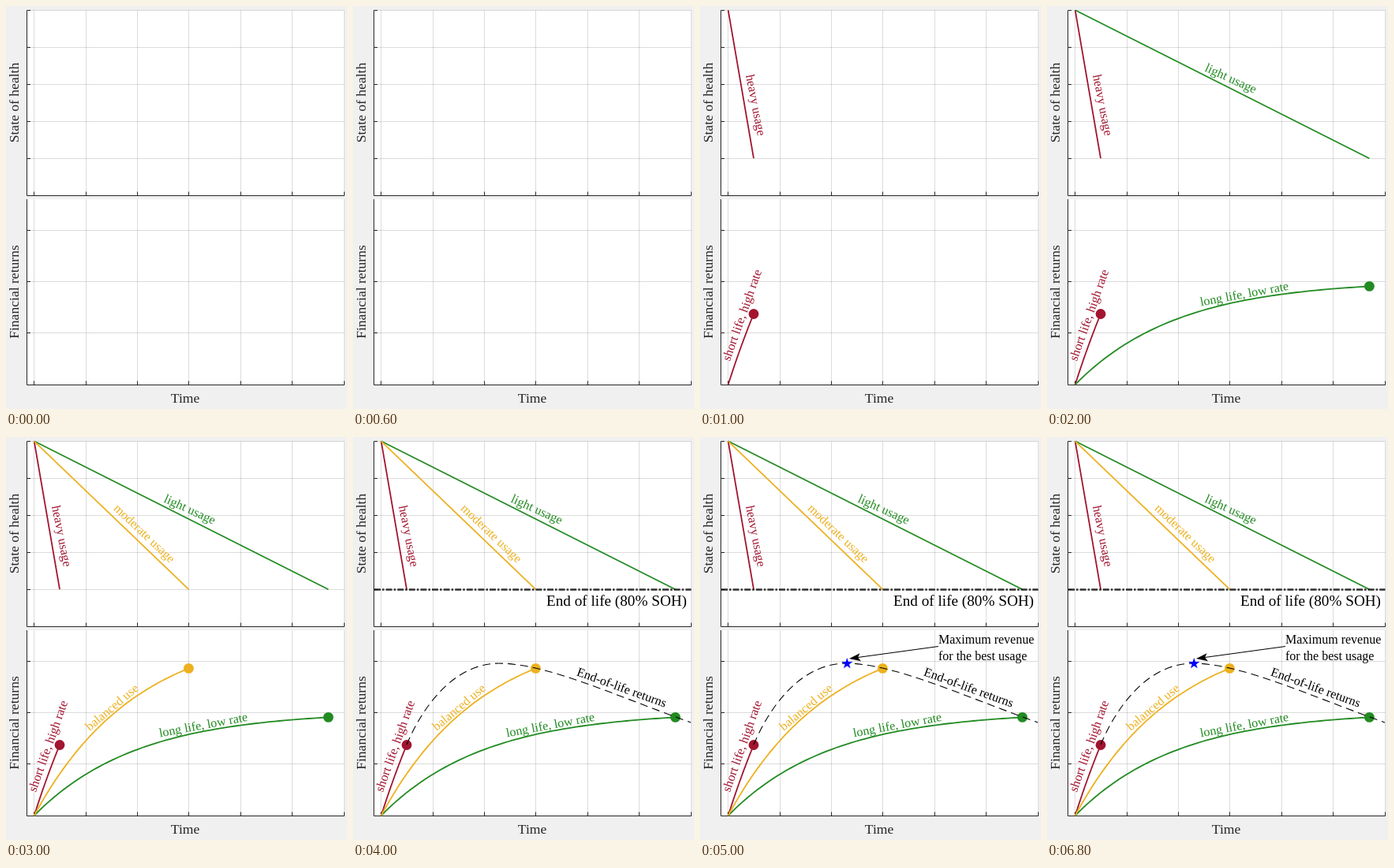
An HTML page that plays this animation: 432 by 511 pixels, repeating every 8 s.

```html
<!DOCTYPE html>
<html lang="en">
<head>
<meta charset="utf-8">
<title>Battery usage and returns</title>
<style>
  html, body { margin: 0; width: 100%; height: 100%; overflow: hidden; background: #f0f0f0; }
  svg { display: block; }
  text { font: 16px "Liberation Serif", "Times New Roman", serif; }
  .label { font-size: 17.6px; fill: #262626; text-anchor: middle; }
  .curve { fill: none; stroke-width: 1.8; }
</style>
</head>
<body>
<svg id="stage" width="432" height="511" viewBox="0 0 432 511"></svg>
<script>
const LEFT = 26.5, RIGHT = 428.5, ORIGIN = 35.7;
const TOP = 5.3, END_OF_LIFE = 193.2, BASE = 480;
const RED = "#a2142f", GREEN = "#228b22", YELLOW = "#edb120";
const DECAY = 0.0077;

const path = (d, attrs) => `<path d="${d}" ${attrs}/>`;
const label = (x, y, angle, text, attrs = "") =>
  `<text transform="translate(${x} ${y}) rotate(${angle})" ${attrs}>${text}</text>`;

function axes(top, bottom, yTicks) {
  const xTicks = [35.5, 101.5, 166.5, 231.5, 297.5, 362.5, 428.5];
  let grid = "", ticks = `M${LEFT} ${top}V${bottom}H${RIGHT}`;
  for (const x of xTicks) {
    grid += `M${x} ${top}V${bottom}`;
    ticks += `M${x} ${bottom}v-5`;
  }
  for (const y of yTicks) {
    grid += `M${LEFT} ${y}H${RIGHT}`;
    ticks += `M${LEFT} ${y}h4.5`;
  }
  return `<rect x="26" y="${top}" width="403" height="${bottom - top}" fill="#fff"/>` +
    path(grid, 'stroke="#262626" stroke-opacity=".16"') +
    path(ticks, 'fill="none" stroke="#262626"');
}

// A straight loss of health above, saturating returns below.
function usage(color, endX, endY, ...labels) {
  const span = endX - ORIGIN;
  const scale = (BASE - endY) / (1 - Math.exp(-DECAY * span));
  let returns = `M${ORIGIN} ${BASE}`;
  for (let i = 1; i <= 60; i++) {
    const t = span * i / 60;
    returns += `L${ORIGIN + t} ${BASE - scale * (1 - Math.exp(-DECAY * t))}`;
  }
  const line = `M${ORIGIN} ${TOP}L${endX} ${END_OF_LIFE}`;
  return path(line + returns, `class="curve" stroke="${color}"`) +
    `<circle cx="${endX}" cy="${endY}" r="6.4" fill="${color}"/>` +
    labels.map(args => label(...args, `fill="${color}"`)).join("");
}

function star(cx, cy, radius) {
  const points = Array.from({ length: 10 }, (_, i) => {
    const r = i % 2 ? radius * 0.382 : radius, a = i * Math.PI / 5;
    return `${cx + r * Math.sin(a)},${cy - r * Math.cos(a)}`;
  });
  return `<polygon points="${points.join(" ")}" fill="#00f"/>`;
}

const stages = [
  axes(5.5, 240.5, [5.5, 52.5, 99.5, 146.5, 193.5]) +
  axes(245, 480.5, [284.5, 349.5, 414.5]) +
  label(16, 122.5, -90, "State of health", 'class="label"') +
  label(16, 362.5, -90, "Financial returns", 'class="label"') +
  label(227, 503, 0, "Time", 'class="label"'),

  usage(RED, 68, 390.5,
    [58, 88, 79, "heavy usage"],
    [37.7, 451, -70.5, "short life, high rate"]),

  usage(GREEN, 408.4, 355.4,
    [199, 82, 24.5, "light usage"],
    [195, 380.5, -10.5, "long life, low rate"]),

  usage(YELLOW, 231.4, 293.4,
    [135.5, 91.5, 43.5, "moderate usage"],
    [106, 373, -40, "balanced use"]),

  path(`M27 193.5H${RIGHT}`,
    'stroke="#000" stroke-opacity=".8" stroke-width="2.6" stroke-dasharray="8 2 2.6 2"') +
  label(245, 214, 0, "End of life (80% SOH)", 'style="font-size:19.2px"') +
  path("M68 390C90 338 130 287 185 287C245 287 330 327 428 362",
    'fill="none" stroke="#000" stroke-width="1.1" stroke-dasharray="10 6"') +
  label(282.5, 302, 20, "End-of-life returns"),

  star(186.3, 287.3, 7.4) +
  path("M302 265.5L198 279.8", 'stroke="#000" stroke-width="1.1"') +
  path("M189 281L202.5 274.2L200 279.5L204 284.3Z", "") +
  label(302, 262, 0, "Maximum revenue") +
  label(302, 283, 0, "for the best usage")
];

const stage = document.getElementById("stage");
stage.innerHTML = stages.map(content => `<g>${content}</g>`).join("");
const groups = [...stage.children];
const start = performance.now();

function draw() {
  const step = Math.floor((performance.now() - start) % 8000 / 1000);
  groups.forEach((group, i) => group.style.display = i <= step ? "" : "none");
  requestAnimationFrame(draw);
}
draw();
</script>
</body>
</html>
```
